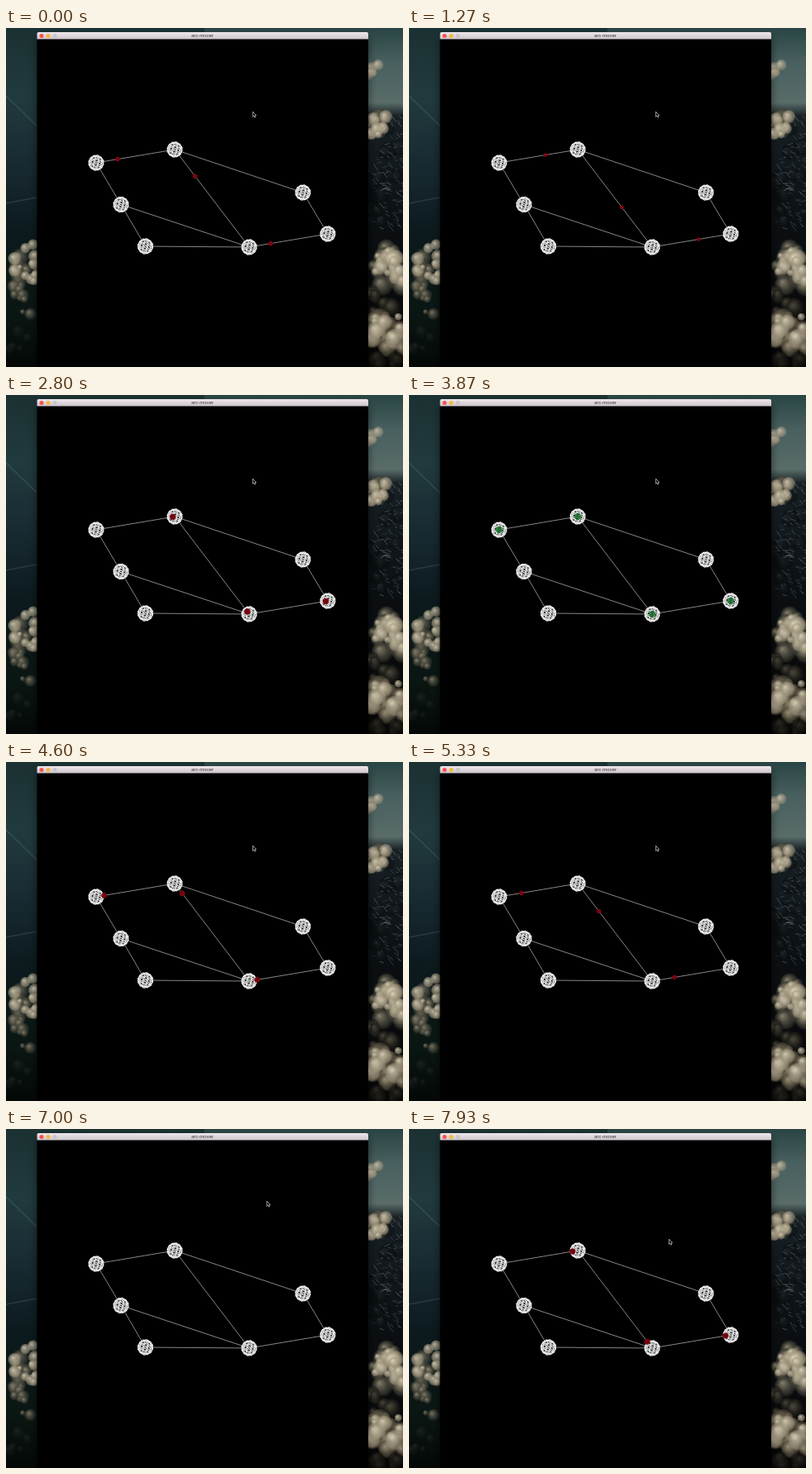
Animation, 480 px wide and 410 px high, one loop 8 s. Source, as an HTML page with a canvas:

```html
<!DOCTYPE html>
<html lang="en">
<head>
<meta charset="utf-8">
<title>arc-mover</title>
<style>
html, body { margin: 0; width: 100%; height: 100%; overflow: hidden; background: #000; }
canvas { display: block; width: 100vw; height: 100vh; }
</style>
</head>
<body>
<canvas id="stage"></canvas>
<script>
const W = 480, H = 410, LOOP = 8000;
const dpr = window.devicePixelRatio || 1;

const nodes = {
  a: [109, 163], b: [204, 147], c: [139, 213.5], d: [294, 265],
  e: [389, 249], f: [168.5, 264], g: [359, 199]
};
const links = ['ab', 'ac', 'cf', 'cd', 'fd', 'bd', 'bg', 'ge', 'de'];
const routes = ['ab', 'bd', 'de'];
const trips = [[-1095, 2930], [4195, 8195]];
const pulse = { from: 3065, full: 3740, to: 4190 };
const blink = [6985, 7062];
const pointerPath = [
  [0, 298, 101], [5900, 298, 101], [6350, 315, 85],
  [6650, 315, 87], [7390, 315, 87], [7870, 314, 133], [LOOP, 314, 133]
];

function prepare(canvas) {
  canvas.width = W * dpr;
  canvas.height = H * dpr;
  const ctx = canvas.getContext('2d');
  ctx.scale(dpr, dpr);
  return ctx;
}

function disc(ctx, x, y, r, fill) {
  ctx.fillStyle = fill;
  ctx.beginPath();
  ctx.arc(x, y, r, 0, Math.PI * 2);
  ctx.fill();
}

// Icosahedron split once, as a list of edges
function makeMesh() {
  const phi = (1 + Math.sqrt(5)) / 2;
  const unit = p => p.map(v => v / Math.hypot(...p));
  const dist = (p, q) => Math.hypot(p[0] - q[0], p[1] - q[1], p[2] - q[2]);
  const base = [];
  for (const s of [-1, 1]) for (const u of [-phi, phi])
    base.push([0, s, u], [s, u, 0], [u, 0, s]);
  const points = base.map(unit);
  base.forEach((p, i) => base.slice(i + 1).forEach(q => {
    if (dist(p, q) < 2.1) points.push(unit(p.map((v, k) => v + q[k])));
  }));
  const turn = ([x, y, z]) => {
    const c = Math.cos(0.22), s = Math.sin(0.22);
    const u = x * c + z * s, w = z * c - x * s;
    return [u * c - y * s, y * c + u * s, w];
  };
  const edges = [];
  points.forEach((p, i) => points.slice(i + 1).forEach(q => {
    if (dist(p, q) < 0.65) edges.push([turn(p), turn(q)]);
  }));
  return edges;
}
const mesh = makeMesh();

function wire(ctx, x, y, r, color, width) {
  ctx.strokeStyle = color;
  ctx.lineWidth = width;
  ctx.beginPath();
  for (const [p, q] of mesh) {
    // Nearer points spread a little wider
    const m = r * (1 + p[2] * 0.04), n = r * (1 + q[2] * 0.04);
    ctx.moveTo(x + p[0] * m, y + p[1] * m);
    ctx.lineTo(x + q[0] * n, y + q[1] * n);
  }
  ctx.stroke();
}

function puff(ctx, x, y, r, light, dark, alpha) {
  const g = ctx.createRadialGradient(x - r * 0.3, y - r * 0.3, 0, x, y, r);
  g.addColorStop(0, `rgba(${light},${alpha})`);
  g.addColorStop(0.8, `rgba(${dark},${alpha * 0.7})`);
  g.addColorStop(1, `rgba(${dark},0)`);
  disc(ctx, x, y, r, g);
}

function fade(ctx, x, w, stops) {
  const g = ctx.createLinearGradient(0, 0, 0, H);
  stops.forEach(([p, c]) => g.addColorStop(p, c));
  ctx.fillStyle = g;
  ctx.fillRect(x, 0, w, H);
}

function drawDesktop(ctx) {
  const cream = '222,213,188', tan = '158,148,124', shade = '62,62,52', night = '8,12,14';
  let seed = 11;
  const rnd = () => (seed = seed * 16807 % 2147483647) / 2147483647;
  const scatter = (n, x, y, w, h, size, light, dark, alpha) => {
    for (let i = 0; i < n; i++)
      puff(ctx, x + rnd() * w, y + rnd() * h, size * (0.5 + rnd()), light, dark, alpha);
  };
  fade(ctx, 0, 240, [[0, '#1b3132'], [0.2, '#213a3d'], [0.38, '#192c33'],
    [0.6, '#0c1a1e'], [0.85, '#0a1612'], [1, '#040806']]);
  fade(ctx, 240, 240, [[0, '#294543'], [0.1, '#48605f'], [0.22, '#596c69'],
    [0.26, '#182024'], [0.6, '#0b0f12'], [1, '#060605']]);

  // Light streaks at the left
  ctx.strokeStyle = 'rgba(160,190,195,.16)';
  ctx.lineWidth = 1.5;
  ctx.beginPath();
  ctx.moveTo(0, 82); ctx.lineTo(37, 118);
  ctx.moveTo(0, 212); ctx.lineTo(37, 205);
  ctx.stroke();

  // Cloud bank at the left
  scatter(10, 10, 264, 26, 60, 9, tan, shade, 0.8);
  scatter(14, 10, 262, 26, 44, 6, cream, tan, 0.85);
  scatter(8, 8, 310, 22, 36, 6, tan, shade, 0.75);
  scatter(5, 0, 360, 30, 30, 8, '40,52,44', night, 0.5);

  // Rock face at the right
  scatter(14, 440, 105, 40, 150, 9, '34,42,48', night, 0.7);
  ctx.lineWidth = 1;
  for (let i = 0; i < 110; i++) {
    const x = 442 + rnd() * 38, y = 104 + rnd() * 140, d = 2 + rnd() * 5;
    const v = 50 + rnd() * 70;
    ctx.strokeStyle = `rgba(${v},${v + 8},${v + 14},.6)`;
    ctx.beginPath();
    ctx.moveTo(x, y);
    ctx.lineTo(x + d, y + d * (rnd() * 2 - 0.5));
    ctx.stroke();
  }
  scatter(6, 438, 160, 10, 90, 8, night, night, 0.7);

  // Clouds at the right
  scatter(6, 436, 44, 16, 16, 6, cream, tan, 0.8);
  scatter(8, 440, 106, 22, 28, 8, tan, shade, 0.85);
  scatter(12, 440, 104, 22, 28, 6, cream, tan, 0.85);
  scatter(16, 442, 264, 38, 56, 11, tan, shade, 0.85);
  scatter(16, 446, 264, 34, 42, 8, cream, tan, 0.85);
  scatter(8, 438, 318, 42, 26, 8, '84,78,64', '28,27,23', 0.85);
  scatter(16, 438, 346, 42, 46, 11, tan, '84,76,60', 0.9);
  scatter(10, 438, 346, 42, 34, 9, cream, tan, 0.85);
  scatter(7, 438, 398, 42, 12, 9, '50,45,36', '18,17,14', 0.8);
}

function drawWindow(ctx) {
  ctx.save();
  ctx.shadowColor = 'rgba(0,0,0,.55)';
  ctx.shadowBlur = 10 * dpr;
  ctx.shadowOffsetY = 4 * dpr;
  ctx.fillStyle = '#000';
  ctx.fillRect(37.5, 8, 400.5, 402);
  ctx.restore();

  const g = ctx.createLinearGradient(0, 5, 0, 14);
  g.addColorStop(0, '#eee7ec');
  g.addColorStop(1, '#cbc3c9');
  ctx.fillStyle = g;
  ctx.beginPath();
  ctx.roundRect(37.5, 5, 400.5, 8.6, [2, 2, 0, 0]);
  ctx.fill();
  ['#f8504f', '#f6b73c', '#c9c4c8'].forEach((c, i) =>
    disc(ctx, 43 + i * 8, 9.5, 2.5, c));
  ctx.fillStyle = '#3c393c';
  ctx.font = '6px "Liberation Sans", sans-serif';
  ctx.textAlign = 'center';
  ctx.fillText('arc-mover', 237.5, 11.4);
}

function drawLinks(ctx) {
  ctx.strokeStyle = 'rgba(255,255,255,.7)';
  ctx.lineWidth = 0.75;
  ctx.beginPath();
  for (const [p, q] of links) {
    ctx.moveTo(...nodes[p]);
    ctx.lineTo(...nodes[q]);
  }
  ctx.stroke();
  for (const [x, y] of Object.values(nodes)) {
    disc(ctx, x, y, 9, '#1c1c1c');
    wire(ctx, x, y, 9.3, '#fff', 0.72);
  }
}

function drawPulse(ctx, t) {
  if (t < pulse.from || t >= pulse.to) return;
  const grow = Math.min(1, (t - pulse.from) / (pulse.full - pulse.from));
  const r = 1 + 2.8 * grow;
  for (const key of 'abde') {
    const [x, y] = nodes[key];
    disc(ctx, x, y, r, '#052c10');
    wire(ctx, x, y, r, '#127a2c', 0.35);
    ctx.save();
    ctx.beginPath();
    ctx.arc(x, y, r, 0, Math.PI * 2);
    ctx.clip();
    wire(ctx, x, y, 9.3, 'rgba(255,255,255,.35)', 0.35);
    ctx.restore();
  }
}

function drawDots(ctx, t) {
  if (t >= blink[0] && t < blink[1]) return;
  const trip = trips.find(([from, to]) => t >= from && t < to);
  if (!trip) return;
  const k = (t - trip[0]) / (trip[1] - trip[0]);
  const u = trip[0] < 0 ? k * (trip[1] - trip[0]) / 4000 : k;
  const at = Math.min(1, u);
  // Smallest halfway, largest at the nodes
  const r = 1.7 + 3.6 * Math.abs(at - 0.5);
  for (const [p, q] of routes) {
    const [x0, y0] = nodes[p], [x1, y1] = nodes[q];
    const x = x0 + (x1 - x0) * at, y = y0 + (y1 - y0) * at;
    disc(ctx, x, y, r, '#48040a');
    wire(ctx, x, y, r, '#960a18', 0.25);
  }
}

function drawPointer(ctx, t) {
  const i = pointerPath.findIndex(p => p[0] > t);
  const [t0, x0, y0] = pointerPath[i - 1], [t1, x1, y1] = pointerPath[i];
  const u = (t - t0) / (t1 - t0), k = u * u * (3 - 2 * u);
  ctx.save();
  ctx.translate(x0 + (x1 - x0) * k, y0 + (y1 - y0) * k);
  ctx.beginPath();
  [[0.4, 0.2], [0.4, 6.4], [1.8, 5.1], [2.8, 7.2], [3.7, 6.8],
    [2.8, 4.8], [4.5, 4.7]].forEach(p => ctx.lineTo(...p));
  ctx.closePath();
  ctx.fillStyle = '#000';
  ctx.fill();
  ctx.strokeStyle = '#ccc';
  ctx.lineWidth = 0.75;
  ctx.stroke();
  ctx.restore();
}

const backdrop = document.createElement('canvas');
const back = prepare(backdrop);
drawDesktop(back);
drawWindow(back);
drawLinks(back);

const ctx = prepare(document.getElementById('stage'));

function render() {
  const t = performance.now() % LOOP;
  ctx.drawImage(backdrop, 0, 0, W, H);
  drawPulse(ctx, t);
  drawDots(ctx, t);
  drawPointer(ctx, t);
  requestAnimationFrame(render);
}
render();
</script>
</body>
</html>
```
